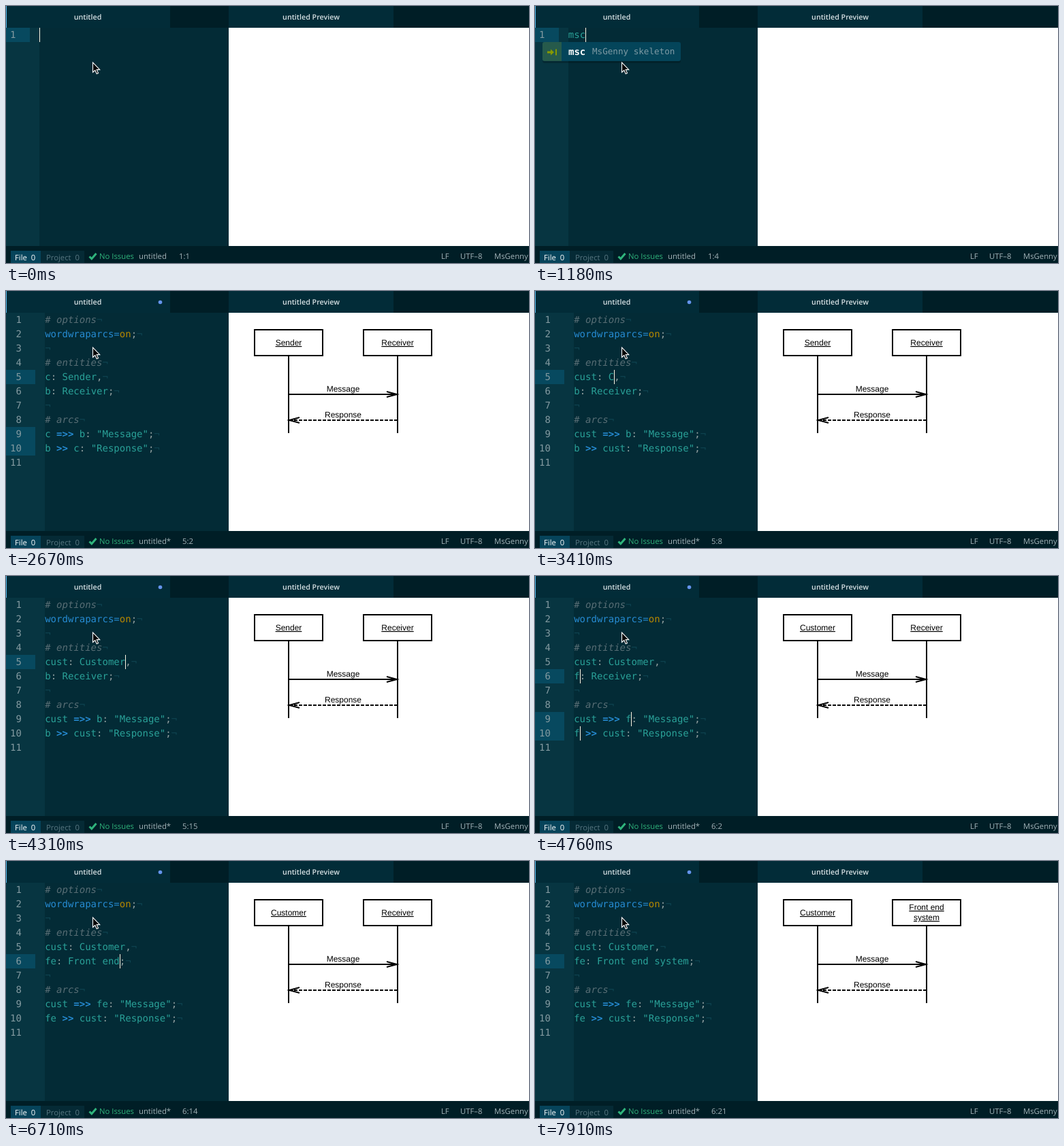
An HTML page for the animation above (8 s loop, 768 px wide and 378 px high).

```html
<!DOCTYPE html>
<html lang="en">
<head>
<meta charset="utf-8">
<title>Editor with live preview</title>
<style>
html, body { margin: 0; width: 100%; height: 100%; overflow: hidden; background: #001e26; }
svg { display: block; width: 768px; height: 378px; text-rendering: geometricPrecision; }
text { white-space: pre; }
.ui { font: 11.3px "Open Sans", "Noto Sans", sans-serif; fill: #a3b3b8; }
.tab { font: 600 10.7px "Open Sans", "Noto Sans", sans-serif; fill: #d8e1e4; text-anchor: middle; }
.code { font: 14px "DejaVu Sans Mono", monospace; fill: #93a1a1; }
.num { fill: #839aa0; text-anchor: end; }
.note { fill: #586e75; font-style: italic; }
.key { fill: #268bd2; }
.op { fill: #268bd2; font-weight: bold; }
.val { fill: #b58900; }
.id { fill: #2aa198; }
.eol { fill: #0f4552; }
.chart { font: 12px "Liberation Sans", Arial, sans-serif; text-anchor: middle; }
.name { text-decoration: underline; }
.line { fill: none; stroke: #000; stroke-width: 2; }
</style>
</head>
<body>
<svg viewBox="0 0 768 378">
  <rect width="768" height="378" fill="#001e26"/>
  <rect width="241" height="32" fill="#022c38"/>
  <rect width="1" height="32" fill="#55b9ee"/>
  <rect x="327" width="242" height="32" fill="#022c38"/>
  <rect y="32" width="327" height="321" fill="#032b36"/>
  <rect x="327" y="32" width="441" height="321" fill="#fff"/>
  <text class="tab" x="120" y="20">untitled</text>
  <text class="tab" x="448" y="20">untitled Preview</text>
  <circle id="dot" cx="226.5" cy="16.5" r="2.8" fill="#6494ed"/>

  <rect x="7" y="360" width="44" height="18" fill="#06445b"/>
  <rect x="51" y="360" width="64" height="18" fill="#052a35"/>
  <text class="ui" x="13" y="374" style="fill:#fff">File  0</text>
  <text class="ui" x="59" y="374" style="fill:#577680">Project  0</text>
  <path d="M122.500 368.500l3.300 3.300L132.500 364" fill="none" stroke="#2fb47c" stroke-width="3"/>
  <text class="ui" x="137" y="372" style="fill:#2fb47c">No Issues</text>
  <text class="ui" x="639" y="372">LF</text>
  <text class="ui" x="667" y="372">UTF–8</text>
  <text class="ui" x="717" y="372">MsGenny</text>
  <g id="status"></g>

  <g id="editor"></g>

  <g id="popup">
    <rect x="11" y="55" width="203" height="29" rx="3" fill="#000" opacity=".22"/>
    <rect x="11" y="53" width="203" height="28" rx="3" fill="#04455a"/>
    <path d="M14 53h25v28H14a3 3 0 0 1-3-3V56a3 3 0 0 1 3-3z" fill="#265a4b"/>
    <path d="M18 66.500h5v-3l5 4.500-5 4.500v-3h-5zM30 63.500h2v9h-2z" fill="#859900"/>
    <text class="code" x="49" y="72" style="fill:#fff;font-weight:bold">msc</text>
    <text class="code" x="84" y="71" style="fill:#7f9ba5;font-size:12.600px">MsGenny skeleton</text>
  </g>

  <g id="chart" class="chart">
    <path class="line" d="M365 57h100v38h-100zM525 57h100v38h-100zM415 95v114M575 95v114M415 152h159M559 148l15 4-15 4"/>
    <path class="line" d="M575 190H416" stroke-dasharray="5 2"/>
    <path class="line" d="M431 186l-15 4 15 4"/>
    <text x="495" y="148">Message</text>
    <text x="495" y="186">Response</text>
    <g id="names"></g>
  </g>

  <path d="M127.500 83v14.500l3.300-3 2.400 5.300 2.300-1-2.300-5.200h4.500z" fill="#000" stroke="#fff" stroke-width="1.100"/>
</svg>
<script>
const LOOP = 8000, CHAR = 8.428, ROW = 21, TOP = 32;
const el = id => document.getElementById(id);
const show = (id, on) => el(id).setAttribute('display', on ? 'inline' : 'none');

// Each entry changes part of the state from its time on.
const steps = [
  [0, { typed: '', caret: true, popup: false, open: false, chart: false,
        a: 'a', A: 'Sender', b: 'b', B: 'Receiver', left: 'Sender', right: ['Receiver'] }],
  [290, { caret: false }],
  [740, { typed: 'm', caret: true }],
  [890, { typed: 'ms', popup: true }],
  [1030, { typed: 'msc' }],
  [1480, { open: true, popup: false, field: 'a', sel: true }],
  [1780, { chart: true }],
  [2670, { a: 'c', sel: false, caret: false }],
  [2820, { a: 'cu', caret: true }],
  [2970, { a: 'cust' }],
  [3110, { field: 'A', sel: true }],
  [3410, { A: 'C', sel: false }],
  ...typing('A', 'Customer', 3710, [2, 4, 5, 7, 8]),
  [4460, { field: 'b', sel: true }],
  [4610, { left: 'Customer' }],
  [4760, { b: 'f', sel: false }],
  [5060, { b: 'fe' }],
  [5210, { field: 'B', sel: true }],
  [5810, { sel: false }],
  ...typing('B', 'Front end system', 5810, [1, 2, 3, 5, 6, 8, 9, 11, 12, 14, 16]),
  [7610, { right: ['Front end', 'system'] }],
  [7910, { caret: false }]
];

function typing(key, word, start, counts) {
  return counts.map((n, i) => [start + 150 * i, { [key]: word.slice(0, n) }]);
}

function stateAt(t) {
  return Object.assign({}, ...steps.filter(s => s[0] <= t).map(s => s[1]));
}

function codeLines(s) {
  if (!s.open) return [[['id', s.typed]]];
  const eol = ['eol', '¬'];
  const entity = (id, label, end) => [['id', id], ['', ': '], ['id', label], ['', end], eol];
  const arc = (from, op, to, label) =>
    [['id', from + ' '], ['op', op], ['id', ' ' + to], ['', ': '], ['id', `"${label}"`], ['', ';'], eol];
  return [
    [['note', '# options'], eol],
    [['key', 'wordwraparcs='], ['val', 'on'], ['', ';'], eol],
    [eol],
    [['note', '# entities'], eol],
    entity(s.a, s.A, ','),
    entity(s.b, s.B, ';'),
    [eol],
    [['note', '# arcs'], eol],
    arc(s.a, '=>>', s.b, 'Message'),
    arc(s.b, '>>', s.a, 'Response'),
    []
  ];
}

// Edited places as [row, column of the end, length].
function places(s) {
  const { a, A, b, B } = s;
  if (!s.open) return [[1, s.typed.length, 0]];
  return {
    a: [[5, a.length, a.length], [9, a.length, a.length], [10, b.length + 4 + a.length, a.length]],
    A: [[5, a.length + 2 + A.length, A.length]],
    b: [[6, b.length, b.length], [9, a.length + 5 + b.length, b.length], [10, b.length, b.length]],
    B: [[6, b.length + 2 + B.length, B.length]]
  }[s.field];
}

const rect = (x, y, w, h, fill) => `<rect x="${x}" y="${y}" width="${w}" height="${h}" fill="${fill}"/>`;
const rowTop = row => TOP + ROW * (row - 1);

function drawEditor(s, spots) {
  const x0 = s.open ? 57.2 : 48.8;
  const gutter = Math.floor(x0) + (s.open ? 0 : 1);
  let out = rect(0, TOP, gutter, 321, '#073541');
  for (const [row, col, len] of spots) {
    const y = rowTop(row);
    out += s.sel
      ? rect(x0 + (col - len) * CHAR, y, len * CHAR, ROW, '#0c4a5e')
      : rect(0, y, gutter - 14, ROW, '#07495f');
  }
  codeLines(s).forEach((line, i) => {
    const y = rowTop(i + 1) + 15;
    const spans = line.map(([c, text]) => `<tspan class="${c}">${text}</tspan>`).join('');
    out += `<text class="code num" x="${x0 - 34.3}" y="${y}">${i + 1}</text>`;
    out += `<text class="code" x="${x0}" y="${y}">${spans}</text>`;
  });
  if (s.caret && !s.sel)
    for (const [row, col] of spots)
      out += rect(Math.round(x0 + col * CHAR), rowTop(row), 1, ROW, '#fdf6e3');
  el('editor').innerHTML = out;
}

function drawStatus(s, [row, col, len]) {
  const x = s.chart ? 259 : 254;
  const pos = `${row}:${col + 1}`;
  const label = (x, text) => `<text class="ui" x="${x}" y="372">${text}</text>`;
  el('status').innerHTML = label(195, s.chart ? 'untitled*' : 'untitled') + label(x, pos) +
    (s.sel ? label(x + 30 + 6.5 * (pos.length - 3), `(1, ${len})`) : '');
}

function drawNames(s) {
  const name = (x, y, text) => `<text class="name" x="${x}" y="${y}">${text}</text>`;
  const first = s.right.length > 1 ? 72 : 80;
  el('names').innerHTML = name(415, 80, s.left) +
    s.right.map((text, i) => name(575, first + 15 * i, text)).join('');
}

let last = '';
function draw(t) {
  const s = stateAt(t), key = JSON.stringify(s);
  if (key === last) return;
  last = key;
  const spots = places(s);
  drawEditor(s, spots);
  drawStatus(s, spots[0]);
  drawNames(s);
  show('popup', s.popup);
  show('chart', s.chart);
  show('dot', s.chart);
}

const start = performance.now();
function tick() {
  draw((performance.now() - start) % LOOP);
  requestAnimationFrame(tick);
}
tick();
</script>
</body>
</html>
```
